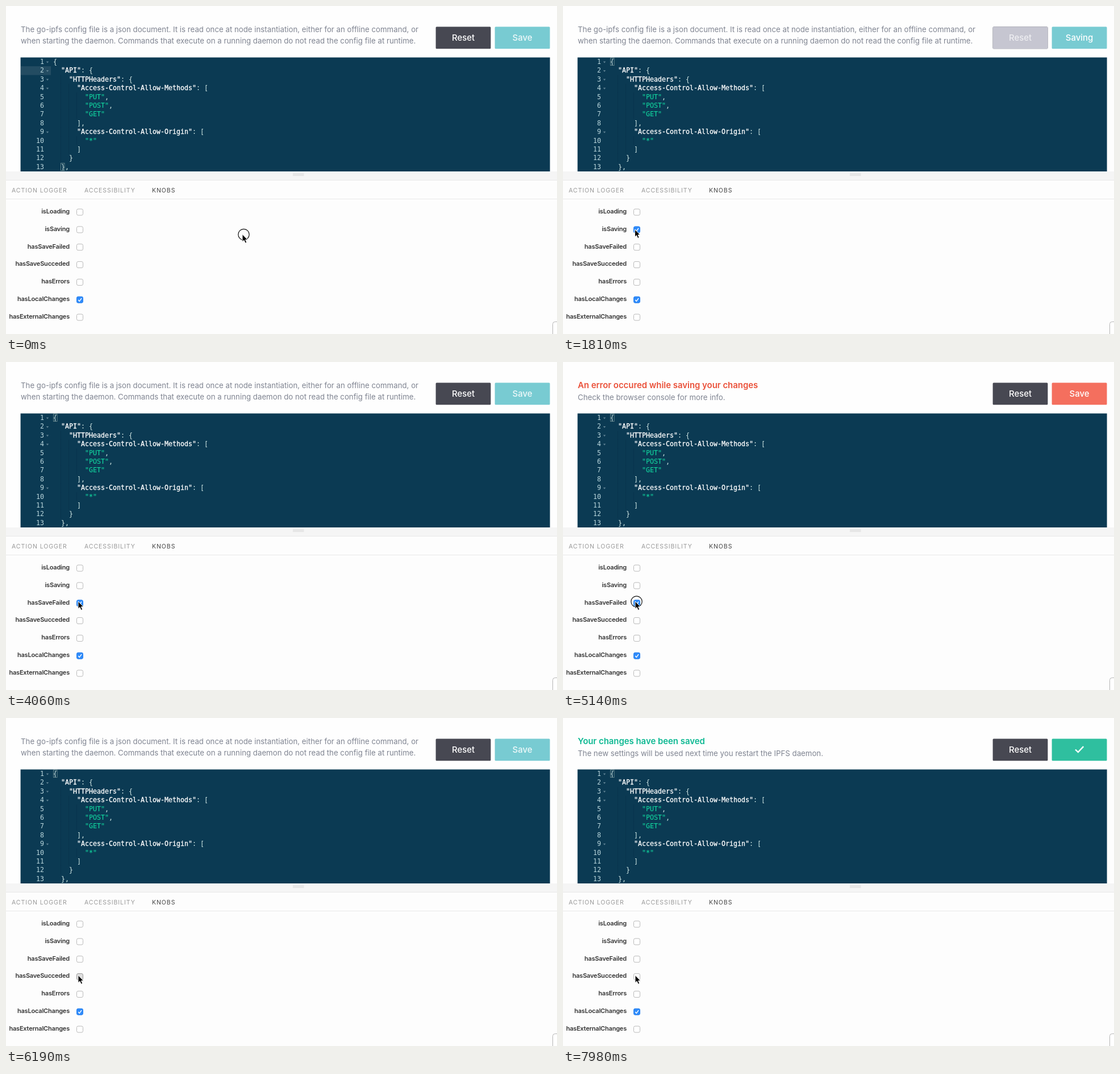
Write an HTML page that moves like this. It is 970 by 577 pixels and loops after 8000 ms.

```html
<!DOCTYPE html>
<html lang="en">
<head>
<meta charset="utf-8">
<title>Config editor</title>
<style>
  html, body { margin: 0; width: 100%; height: 100%; overflow: hidden; background: #fefefe; }
  svg { display: block; width: 970px; height: 577px; font-family: Inter, "Open Sans", sans-serif; }
  text { white-space: pre; }
  .copy { font-size: 13.25px; fill: #7f8491; }
  .head { font-size: 14.9px; font-weight: 600; }
  .btn { font-size: 14.9px; font-weight: 500; fill: #fff; text-anchor: middle; }
  .tab { font-size: 10.5px; letter-spacing: .95px; fill: #999; }
  .knob { font-size: 11px; font-weight: 600; letter-spacing: -.2px; fill: #333; text-anchor: end; }
  .code { font: 11.63px "DejaVu Sans Mono", monospace; fill: #d3e9e6; }
  .num { fill: #b9d6dc; text-anchor: end; }
  .key { fill: #fff; stroke: #fff; stroke-width: .3px; }
  .str { fill: #12cb9a; stroke: #12cb9a; stroke-width: .2px; }
</style>
</head>
<body>
<svg id="stage" viewBox="0 0 970 577">
  <g id="intro" class="copy">
    <text x="26" y="46">The go-ipfs config file is a json document. It is read once at node instantiation, either for an offline command, or</text>
    <text x="26" y="66">when starting the daemon. Commands that execute on a running daemon do not read the config file at runtime.</text>
  </g>
  <g id="failed" class="copy">
    <text class="head" x="26" y="46" fill="#ea5039">An error occured while saving your changes</text>
    <text x="26" y="67">Check the browser console for more info.</text>
  </g>
  <g id="saved" class="copy">
    <text class="head" x="26" y="46" fill="#0cb892">Your changes have been saved</text>
    <text x="26" y="67">The new settings will be used next time you restart the IPFS daemon.</text>
  </g>

  <rect x="756.600" y="36.600" width="96.800" height="38.600" rx="1.500" fill="#474852"/>
  <rect id="resetOff" x="756.600" y="36.600" width="96.800" height="38.600" rx="1.500" fill="#c6c6d1"/>
  <text id="resetText" class="btn" x="805" y="60.500">Reset</text>
  <rect id="saveBox" x="860.600" y="36.600" width="96.900" height="38.600" rx="1.500"/>
  <text id="saveText" class="btn" x="909" y="60.500">Save</text>
  <path id="tick" d="M902 55.500l4.800 4.600 9.400-10" fill="none" stroke="#fff" stroke-width="2.400"/>

  <rect x="25.600" y="90.500" width="932" height="200.500" fill="#0b3a53"/>
  <rect id="activeLine" x="26" y="106" width="53" height="15.400" fill="#234c62"/>
  <g id="code" class="code"></g>
  <rect id="bracket" width="6.500" height="13" fill="none" stroke="#5f8088"/>
  <rect id="caret" x="152.500" y="106" width="1.800" height="15" fill="#d8654c"/>

  <rect y="291" width="970" height="16" fill="#f5f5f5"/>
  <rect y="307" width="970" height="270" fill="#fdfdfd"/>
  <path d="M0 306.500H970M0 339.500H970" stroke="#e9e9e9"/>
  <path d="M505 295.500h19.500M505 298h19.500" stroke="#d2d2d2"/>
  <text class="tab" x="10" y="327.500">ACTION LOGGER</text>
  <text class="tab" x="138" y="327.500">ACCESSIBILITY</text>
  <text class="tab" x="257" y="327.500" style="fill:#444">KNOBS</text>
  <g id="knobs"></g>
  <rect x="962.500" y="555.500" width="30" height="40" rx="4" fill="#fff" stroke="#b5b5b5"/>

  <circle id="ring" r="9.700" fill="none" stroke="#111" stroke-width="1.200"/>
  <path id="pointer" d="M0 0V13.200L3 10.500 5.200 15.500 7.700 14.400 5.500 9.700H9.500Z" stroke="#fff"/>
</svg>
<script>
const LOOP = 8000, LINE = 15.4, COL = 7;
const $ = id => document.getElementById(id);

function add(parent, tag, attrs, text) {
  const el = document.createElementNS("http://www.w3.org/2000/svg", tag);
  for (const k in attrs) el.setAttribute(k, attrs[k]);
  if (text) el.textContent = text;
  return parent.appendChild(el);
}
const show = (el, on) => el.setAttribute("visibility", on ? "visible" : "hidden");

const source = [
  "{", '  "API": {', '    "HTTPHeaders": {', '      "Access-Control-Allow-Methods": [',
  '        "PUT",', '        "POST",', '        "GET"', "      ],",
  '      "Access-Control-Allow-Origin": [', '        "*"', "      ]", "    }", "  },"
];
source.forEach((line, i) => {
  const y = 102 + i * LINE, body = line.trim(), indent = line.length - body.length;
  add($("code"), "text", { x: 67, y, class: "num" }, String(i + 1));
  if (/[{[]$/.test(body)) add($("code"), "path", { d: `M70.8 ${y - 4.5}h4.4l-2.2 3z`, fill: "#5d8092" });
  for (let c = 2; c < indent; c += 2) {
    add($("code"), "rect", { x: 82 + COL * c, y: y - 11.5, width: 1, height: LINE, fill: "#08304a", opacity: .6 });
  }
  const row = add($("code"), "text", { x: 83 + COL * indent, y });
  const [, quoted, rest] = body.match(/^("[^"]*")?(.*)$/);
  if (quoted) add(row, "tspan", { class: rest[0] === ":" ? "key" : "str" }, quoted);
  if (rest) add(row, "tspan", {}, rest);
});

const names = ["isLoading", "isSaving", "hasSaveFailed", "hasSaveSucceded", "hasErrors", "hasLocalChanges", "hasExternalChanges"];
const boxes = names.map((name, i) => {
  const y = 362.6 + i * 30.83;
  add($("knobs"), "text", { x: 112, y: y + 2.4, class: "knob" }, name);
  const box = add($("knobs"), "rect", { x: 124.5, y: y - 5.5, width: 11, height: 11, rx: 2.5 });
  const mark = add($("knobs"), "path", {
    d: `M127.2 ${y + .3}l2.1 2.3 3.7-5.2`, fill: "none", stroke: "#fff", "stroke-width": 1.5
  });
  return { box, mark };
});

// Step tables: [start ms, value...]
const moves = [
  [0, 416, 401.5], [260, 409, 403], [380, 370, 402], [500, 332, 400], [620, 265, 397],
  [740, 190, 394], [860, 145, 396], [980, 126, 397], [1100, 126.5, 393],
  [3470, 127, 423], [3580, 127, 421], [5500, 127, 440], [5600, 127, 455], [5840, 127, 452.5]
];
const fades = [[0, 0], [1460, .3], [1580, .6], [1700, .85], [1810, 1], [2760, .5], [2880, 0]];
const views = [[0, "idle"], [1460, "saving"], [2760, "idle"], [4180, "failed"], [5380, "idle"], [6310, "saved"]];
const rings = [[0, 120], [1100, 1220], [2530, 2650], [3940, 4060], [5140, 5260], [6080, 6190], [7860, 7980]];
const carets = [[120, 620], [1100, 1460]];
const checks = { 1: [1340, 2650], 2: [4060, 5260], 3: [6310, 7980], 5: [0, LOOP] };
const presses = { 3: [6190, 6310] };
const saveColor = { idle: "#78cbd2", saving: "#78cbd2", failed: "#f46f5e", saved: "#2fbf9f" };

const at = (table, t) => table.filter(row => row[0] <= t).pop();
const within = (span, t) => !!span && t >= span[0] && t < span[1];

function draw(t) {
  const [, x, y] = at(moves, t), view = at(views, t)[1], fade = at(fades, t)[1];
  $("pointer").setAttribute("transform", `translate(${x} ${y})`);
  $("ring").setAttribute("transform", `translate(${x + 2.5} ${y + .5})`);
  show($("ring"), rings.some(s => within(s, t)));

  show($("intro"), view === "idle" || view === "saving");
  show($("failed"), view === "failed");
  show($("saved"), view === "saved");
  show($("tick"), view === "saved");
  show($("saveText"), view !== "saved");
  $("saveText").textContent = view === "saving" ? "Saving" : "Save";
  $("saveText").style.opacity = view === "idle" ? .88 : 1;
  $("saveBox").setAttribute("fill", saveColor[view]);
  $("resetOff").setAttribute("opacity", fade);
  $("resetText").setAttribute("opacity", 1 - .3 * fade);

  const focused = t < 1460;
  show($("activeLine"), focused);
  show($("caret"), carets.some(s => within(s, t)));
  $("bracket").setAttribute("x", focused ? 96.5 : 83.5);
  $("bracket").setAttribute("y", focused ? 276.5 : 91.5);

  boxes.forEach(({ box, mark }, i) => {
    const on = within(checks[i], t), down = within(presses[i], t);
    box.setAttribute("fill", on ? "#2f8bfa" : down ? "#dedede" : "#fff");
    box.setAttribute("stroke", on ? "#2a82f0" : down ? "#9c9c9c" : "#bababa");
    show(mark, on);
  });
}

const start = performance.now();
function tick() {
  draw((performance.now() - start) % LOOP);
  requestAnimationFrame(tick);
}
tick();
</script>
</body>
</html>
```
